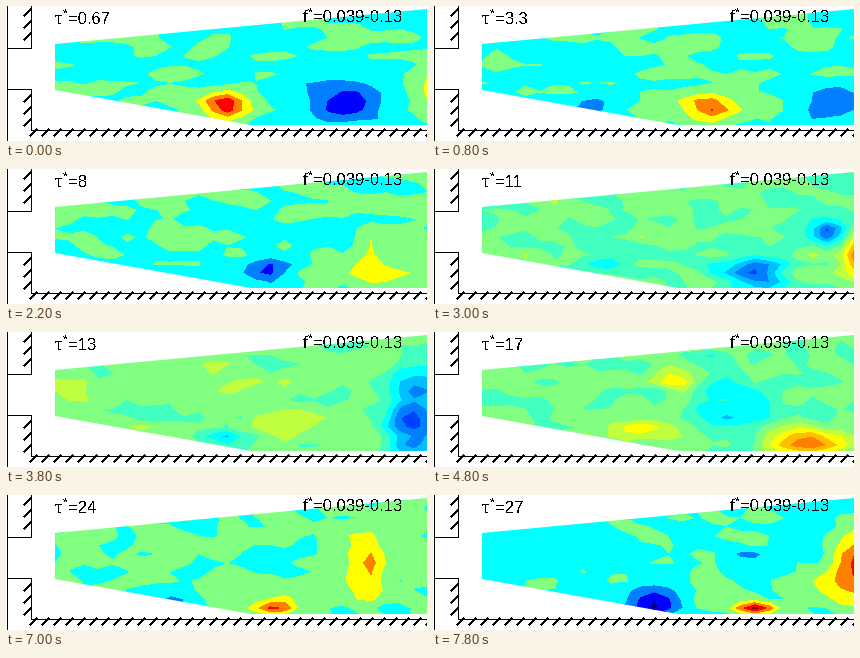
A matplotlib script for the animation above (8000 ms loop, 421 px wide and 135 px high).

```python
import numpy as np
import matplotlib.pyplot as plt
from matplotlib.animation import FuncAnimation
from matplotlib.patches import Polygon

W, H, DPI = 421, 135, 100
FRAMES, STEP_MS = 40, 200
SPEED = 14.3  # downstream drift, px per frame
RIPPLE = .029

plt.rcParams["text.antialiased"] = False
plt.rcParams["font.family"] = "Liberation Sans"


def blob(aspect):
    return lambda x, y, size, amp: (x, y, size, size * aspect, amp)


core, streak, column = blob(.6), blob(.28), blob(2)

# Frame, mean level and vortices of each state
STATES = [
    (0, .43, core(220, 99, 14, .52), core(335, 97, 29, -.3),
     column(421, 85, 9, .18)),
    (8, .41, core(222, 101, 14, -.34), streak(340, 98, 42, .18),
     streak(340, 107, 13, .22), core(330, 45, 60, .05)),
    (15, .47, core(325, 102, 20, -.28), core(395, 62, 14, -.28),
     streak(170, 96, 18, -.12), column(421, 86, 7, .28)),
    (19, .49, column(408, 85, 19, -.28), streak(275, 96, 24, .13),
     streak(215, 108, 20, -.1)),
    (24, .48, streak(370, 111, 28, .32), streak(207, 98, 22, .18),
     core(245, 48, 12, .18), core(305, 72, 35, -.1)),
    (31, .49, core(220, 108, 10, .4), streak(322, 114, 14, -.32),
     core(310, 65, 26, .13), core(412, 95, 25, -.17)),
    (39, .41, core(222, 109, 17, -.38), streak(313, 61, 16, -.18),
     column(421, 65, 11, .42), core(398, 92, 24, .18),
     streak(322, 113, 14, .5), column(268, 85, 12, .07)),
]
KEYS = [s[0] for s in STATES]

X, Y = np.meshgrid(np.arange(35, 436, 14.35), np.arange(-4, 132, 9))


def make_waves(seed, count=36):
    rng = np.random.default_rng(seed)
    return (rng.normal(0, .075, count), rng.normal(0, .19, count),
            rng.uniform(0, 2 * np.pi, count))


WAVES = [make_waves(seed) for seed in range(len(STATES))]


def ripple(k, x):
    kx, ky, phase = WAVES[k]
    waves = np.cos(x[..., None] * kx + Y[..., None] * ky + phase)
    return RIPPLE * waves.sum(-1) * np.sqrt(2 / len(kx))


def swirl(k, x):
    _, level, *blobs = STATES[k]
    total = np.full(x.shape, level)
    for bx, by, sx, sy, amp in blobs:
        total += amp * np.exp(-((x - bx) / sx) ** 2 / 2 - ((Y - by) / sy) ** 2 / 2)
    return total


def field(i):
    """Blend the two neighbouring states while both drift downstream."""
    k = min(np.searchsorted(KEYS, i, side="right") - 1, len(KEYS) - 2)
    a, b = KEYS[k], KEYS[k + 1]
    w = (i - a) / (b - a)
    xa, xb = X - SPEED * (i - a), X + SPEED * (b - i)
    noise = ((1 - w) * ripple(k, xa) + w * ripple(k + 1, xb)) / np.hypot(1 - w, w)
    return np.clip((1 - w) * swirl(k, xa) + w * swirl(k + 1, xb) + noise, 0, 1)


def jet(v):
    return tuple(np.clip(1.5 - np.abs(4 * v - c), 0, 1) for c in (3, 2, 1))


def bands(n):
    return (np.arange(n + 2) - .5) / n, [jet(j / n) for j in range(n + 1)]


COARSE, FINE = bands(8), bands(16)

fig = plt.figure(figsize=(W / DPI, H / DPI), dpi=DPI, facecolor="white")
ax = fig.add_axes([0, 0, 1, 1])
ax.set(xlim=(0, W), ylim=(H, 0))
ax.axis("off")

duct = Polygon([(49, 38), (421, 3), (421, 119), (245, 119), (49, 84)],
               fc="none", ec="none", aa=False)
ax.add_patch(duct)


def line(xs, ys):
    ax.plot(np.array(xs) + .5, np.array(ys) + .5, color="black",
            lw=72 / DPI, aa=False, zorder=3)


def label(x, y, text, size=16.6, **kw):
    return ax.text(x, y, text, fontsize=size * 72 / DPI, zorder=4,
                   va="baseline", **kw)


# Walls with hatching
line([0, 24, 24], [41, 41, -1])
line([0, 24, 24, W], [82, 82, 123, 123])
line([0, 0, W], [-1, 134, 134])
for top in (3, 89):
    for y in range(top, top + 30, 12):
        line([18, 24], [y + 6, y])
for x in range(30, W + 6, 12):
    line([x - 6, x], [129, 123])

label(49, 18, "τ", 18, family="Liberation Serif")
label(57, 11, "*", 12)
clock = label(62, 18, "")
label(297, 16, "f")
label(302, 10, "*", 12)
label(307, 16, "=0.039-0.13")

layer = None


def draw(i):
    global layer
    if layer is not None:
        layer.remove()
    levels, colors = FINE if 12 <= i < 35 else COARSE
    layer = ax.contourf(X, Y, field(i), levels=levels, colors=colors,
                        antialiased=False, zorder=1)
    layer.set_clip_path(duct)
    ax.set(xlim=(0, W), ylim=(H, 0))
    clock.set_text(f"={(i + 1) * 2 / 3:.2g}")
    return layer, clock


anim = FuncAnimation(fig, draw, frames=FRAMES, interval=STEP_MS,
                     repeat=True, repeat_delay=0)
plt.show()
```
